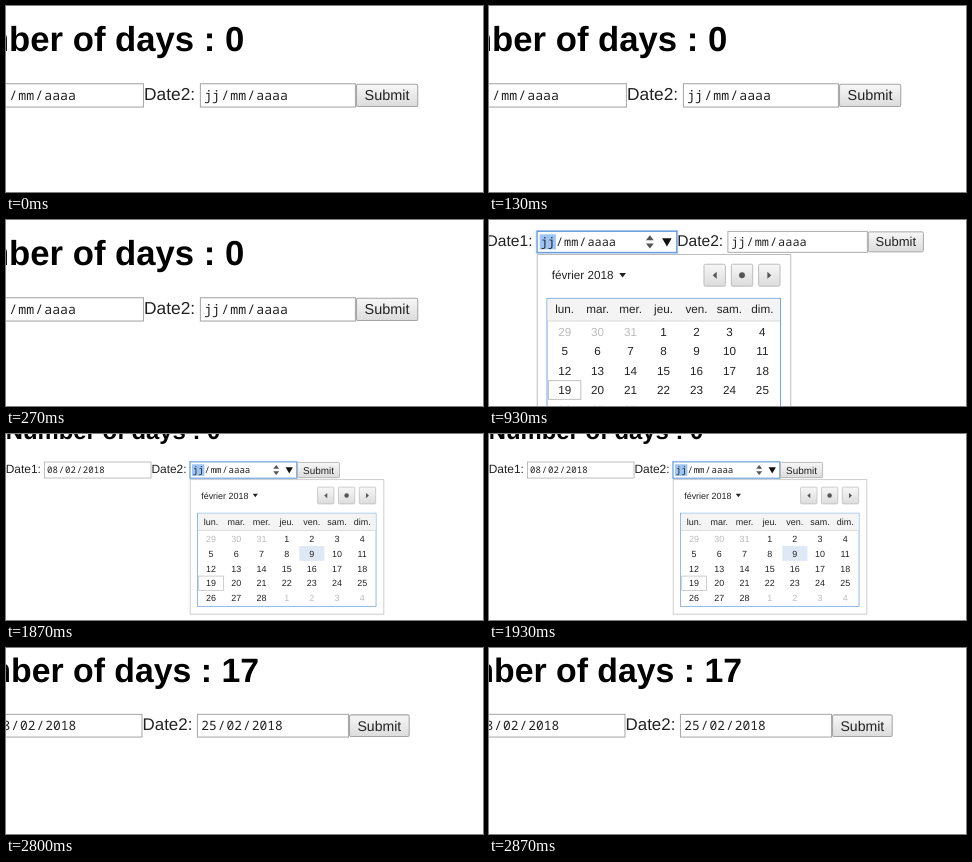
An HTML page for the animation above (3.74 s loop, 477 by 186 pixels).

```html
<!DOCTYPE html>
<html lang="en">
<head>
<meta charset="utf-8">
<title>Number of days</title>
<style>
  html, body { margin: 0; width: 100%; height: 100%; overflow: hidden; background: #fff; }
  svg { display: block; width: 477px; height: 186px; overflow: hidden; }
  text { font-family: "Liberation Sans", Arial, sans-serif; text-rendering: geometricPrecision; white-space: pre; }
  .mono { font-family: "Noto Sans Mono", "DejaVu Sans Mono", monospace; }
</style>
</head>
<body>
<svg id="stage" viewBox="0 0 477 186">
  <defs>
    <linearGradient id="face" x2="0" y2="1">
      <stop offset="0" stop-color="#f7f7f7"/>
      <stop offset="1" stop-color="#dcdcdc"/>
    </linearGradient>
  </defs>
</svg>
<script>
const LOOP = 3740;
const INPUT1 = 51.56, LABEL2 = 195.6, INPUT2 = 247.1, BUTTON = 391.1;
const FIELD_W = 144, POPUP_Y = 8.2;
const EMPTY = 'jj/mm/aaaa';

// Camera (x, y = start of the form's text line) and form state for each shot.
const scenes = [
  { at: 0,    x: -74,  y: 94,   s: 1.084, days: 0,  dates: [EMPTY, EMPTY] },
  { at: 930,  x: -2.5, y: 26,   s: .975,  days: 0,  dates: [EMPTY, EMPTY], focus: 0 },
  { at: 1870, x: -.3,  y: 39.2, s: .745,  days: 0,  dates: ['08/02/2018', EMPTY], focus: 1, hover: 9 },
  { at: 2800, x: -70,  y: 82.2, s: 1.056, days: 17, dates: ['08/02/2018', '25/02/2018'] }
];

const stage = document.getElementById('stage');

function add(parent, tag, attrs, content) {
  const el = document.createElementNS('http://www.w3.org/2000/svg', tag);
  for (const k in attrs) el.setAttribute(k, attrs[k]);
  if (content !== undefined) el.textContent = content;
  return parent.appendChild(el);
}

const group = (p, x, y) => add(p, 'g', { transform: `translate(${x} ${y})` });
const rect = (p, x, y, width, height, fill, more) =>
  add(p, 'rect', { x, y, width, height, fill, ...more });
const text = (p, x, y, size, str, more) =>
  add(p, 'text', { x, y, 'font-size': size, fill: '#222', ...more }, str);
const path = (p, d, fill = '#333') => add(p, 'path', { d, fill });

function dateField(p, x, value, focused) {
  const g = group(p, x, -15.5);
  if (focused) rect(g, -.2, -.2, FIELD_W + .4, 22.9, 'none', { stroke: '#a9cbf5', 'stroke-width': 1.6 });
  rect(g, .5, .5, FIELD_W - 1, 21.5, '#fff', { stroke: focused ? '#5b93d6' : '#a9a9a9' });
  if (focused) {
    rect(g, 3, 3.5, 16.6, 15.5, '#9cc5f6');
    path(g, 'M112 9.5L116 4.5L120 9.5ZM112 13L116 18L120 13Z', '#555');
    path(g, 'M128.6 7.5H138.4L133.5 16Z', '#111');
  }
  const [day, month, year] = value.split('/');
  const parts = [[4, day], [19.7, '/'], [28, month], [43.7, '/'], [52, year]];
  for (const [px, str] of parts) text(g, px, 15.4, 12.2, str, { class: 'mono' });
}

function calendar(p, x, hover) {
  const g = group(p, x, POPUP_Y);
  const pitch = 33.8, left = 28.6;
  const mid = { 'text-anchor': 'middle' };
  rect(g, .5, .5, 260, 180.5, '#fff', { stroke: '#bdbdbd' });
  text(g, 15.3, 26, 12, 'février 2018');
  path(g, 'M84.5 19.5H91.5L88 24Z', '#222');

  [182.5, 210.5, 238.5].forEach((cx, i) => {
    rect(g, cx - 11, 10.5, 22, 22.5, 'url(#face)', { stroke: '#bcbcbc', rx: 1.5 });
    if (i === 1) add(g, 'circle', { cx, cy: 21.8, r: 3, fill: '#555' });
    else {
      const d = i ? 2 : -2;
      path(g, `M${cx - d} 18.3V25.3L${cx + d} 21.8Z`, '#555');
    }
  });

  rect(g, 10.5, 45.5, 239.5, 125, '#fff', { stroke: '#6ea3dc' });
  rect(g, 11, 46, 238.5, 22.5, '#f4f4f4');
  rect(g, 11, 68.3, 238.5, .8, '#ccc');
  ['lun.', 'mar.', 'mer.', 'jeu.', 'ven.', 'sam.', 'dim.'].forEach((name, i) =>
    text(g, left + i * pitch, 60.8, 12, name, mid));

  for (let i = 0; i < 35; i++) {
    const day = i - 2, cx = left + i % 7 * pitch, cy = 79.5 + Math.floor(i / 7) * 20;
    const inMonth = day >= 1 && day <= 28;
    const label = day < 1 ? day + 31 : inMonth ? day : day - 28;
    if (day === hover) rect(g, cx - 16.9, cy - 10, 33.8, 20, '#dfe9f6');
    if (day === 19) rect(g, cx - 16.6, cy - 9.6, 33.2, 19.2, 'none', { stroke: '#bfbfbf' });
    text(g, cx, cy + 4.3, 12, label, { ...mid, fill: inMonth ? '#222' : '#bbb' });
  }
}

function build(sc) {
  const g = add(stage, 'g', { transform: `translate(${sc.x} ${sc.y}) scale(${sc.s})` });
  text(g, 0, -45.3, 32, 'Number of days : ' + sc.days, { 'font-weight': 'bold', fill: '#000' });
  text(g, 0, 0, 16, 'Date1:');
  dateField(g, INPUT1, sc.dates[0], sc.focus === 0);
  text(g, LABEL2, 0, 16, 'Date2:');
  dateField(g, INPUT2, sc.dates[1], sc.focus === 1);
  rect(g, BUTTON + .5, -14.5, 56.5, 20.5, 'url(#face)', { stroke: '#a6a6a6', rx: 1.5 });
  text(g, BUTTON + 28.75, .4, 13.33, 'Submit', { 'text-anchor': 'middle' });
  if (sc.focus !== undefined) calendar(g, sc.focus ? INPUT2 : INPUT1, sc.hover);
  return g;
}

const views = scenes.map(build);
const start = performance.now();

function draw() {
  const t = (performance.now() - start) % LOOP;
  const current = scenes.findLastIndex(sc => t >= sc.at);
  views.forEach((v, i) => v.setAttribute('display', i === current ? 'inline' : 'none'));
  requestAnimationFrame(draw);
}
draw();
</script>
</body>
</html>
```
